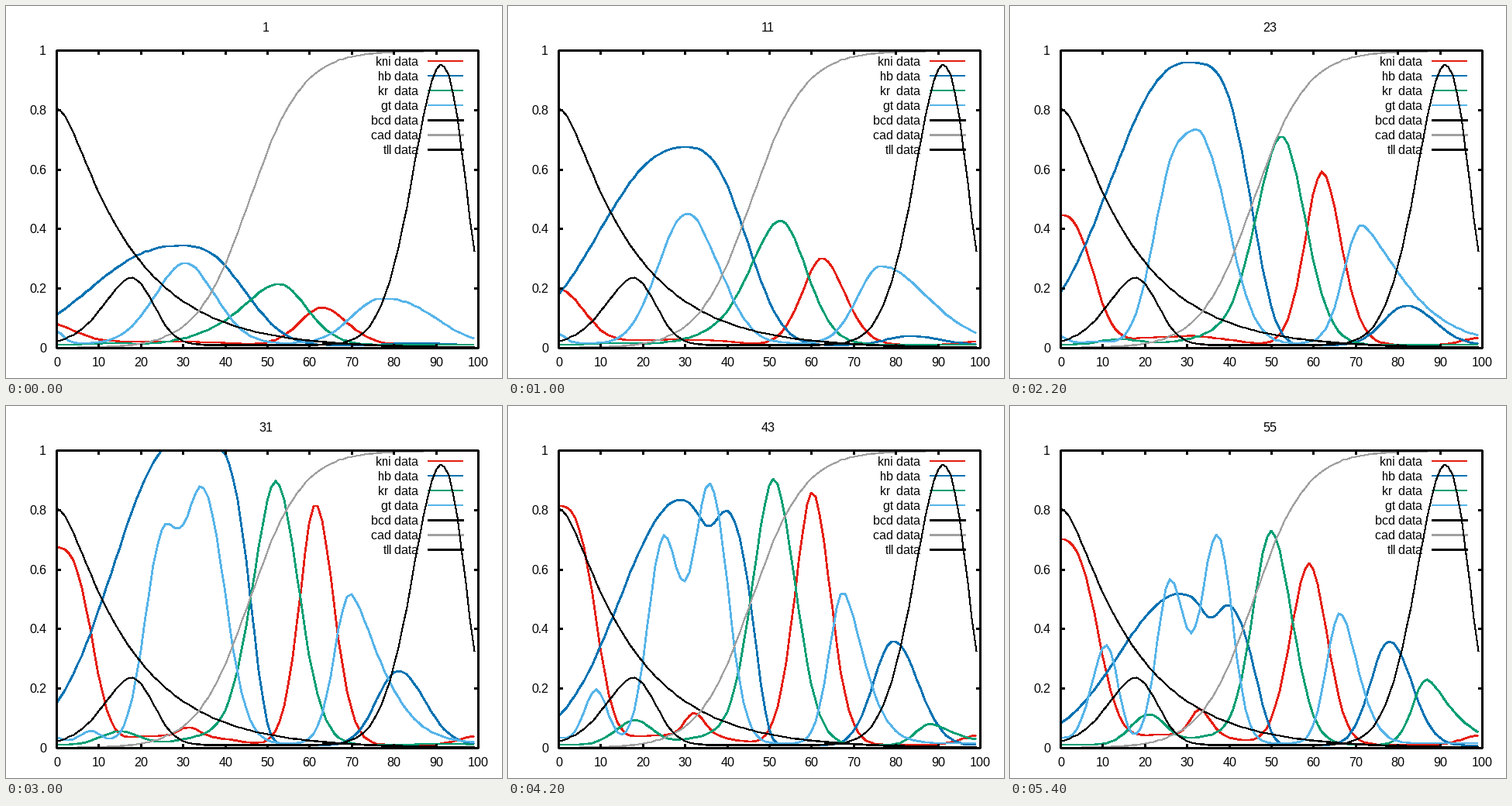
Animation, 640 px wide and 480 px high, one loop 5.5 s. Source, as a matplotlib script:

```python
import numpy as np
import matplotlib.pyplot as plt
from matplotlib.animation import FuncAnimation
from matplotlib.patches import Rectangle

W, H, DPI = 640, 480, 80
FRAMES, INTERVAL = 55, 100
LEFT, RIGHT, TOP, BOTTOM = 65, 609, 57, 441
PT = 72 / DPI  # points per pixel

plt.rcParams["font.family"] = "Liberation Sans"
plt.rcParams["text.hinting"] = "native"
plt.rcParams["text.hinting_factor"] = 1
plt.rcParams["toolbar"] = "None"

X = np.arange(100.0)


def at(value, frame):
    """A constant, or a tuple of keys spread evenly over the loop."""
    if isinstance(value, tuple):
        return np.interp(frame, np.linspace(0, FRAMES - 1, len(value)), value)
    return value


def bump(center, height, left, right, p_left=2, p_right=2):
    """Skewed bell with its own half-width and steepness on each side."""
    def shape(frame):
        c, h, wl, wr, pl, pr = (at(v, frame) for v in (center, height, left, right, p_left, p_right))
        u = np.where(X < c, (c - X) / wl, (X - c) / wr)
        return h * 0.5 ** u ** np.where(X < c, pl, pr)
    return shape


def total(base, *bumps):
    return lambda frame: base + sum(b(frame) for b in bumps)


kni = total(
    0.01,
    bump(0, (.07, .17, .32, .58, .83, .79, .69), 9, (6, 8, 9, 9.3), p_right=(1.4, 2.5, 3.2, 2.8)),
    bump((63, 61.8, 59), (.125, .27, .46, .73, .97, .79, .61), (6.3, 4.4, 5.2), (7, 5, 5), 1.9, 1.9),
    bump((31, 31, 33), (0, 0, 0, .01, .065, .08, .085), 2.5, 3),
    bump(28, (.01, .03, .035), 14, 14, 3, 3),
    bump(100, (0, .03, .033), 5, 5),
)
hb = total(
    0.008,
    bump((30, 30, 30, 28.5), (.335, .64, .87, 1.05, 1.0, .74, .51),
         (24, 21, 17.2, 17), (15.5, 15, 16.3, 17.5), (2.4, 2), (2.6, 3, 7, 6)),
    bump(35.7, (0, 0, 0, 0, -.09, -.09, -.08), 2.8, 2.6),
    bump((84.5, 81.5, 78), (.008, .025, .08, .2, .35, .35, .35), (7, 6.2, 5.2), (9.5, 7.5, 6.2)),
)
kr = total(
    0.01,
    bump((53, 52.4, 50), (.2, .39, .59, .83, .98, .84, .71), (9.2, 6.6, 5.1), (7.7, 6.3, 5.8), 1.9, 1.9),
    bump(38, .03, 9, 9),
    bump((13, 14.5, 21), (.005, .005, .01, .03, .075, .085, .1), (6, 5), (6, 4.5)),
    bump((91, 90, 87), (0, 0, 0, 0, .012, .1, .22), 4, 6.5, 2, 1.4),
)
gt = total(
    0.015,
    bump(0, (.04, .02, .015), 2, 2),
    bump((8, 8, 8, 11), (0, 0, 0, .012, .1, .22, .33), (3, 3, 3, 4.2), 3.1),
    bump((27, 26.5, 24.3, 26), (.15, .24, .41, .61, .75, .64, .54), (7.5, 5.5, 4.5, 3.7), (6.5, 5, 4.4, 4)),
    bump((33.5, 34, 35.3, 37.2), (.17, .28, .5, .77, .96, .82, .7), (6.5, 5.4, 4.9, 4.5), (7.5, 7.5, 5.3, 4.2)),
    bump((77, 77, 72.5, 70.2, 68.8, 67, 66.4), (.15, .25, .34, .47, .57, .48, .44),
         (8, 5.2, 4, 3.8), (14, 12, 5.8, 4.8), 2, (2.5, 1.4, 1.5, 1.7)),
)
tll = total(
    0.011,
    bump(17.5, .226, 7.5, 6.3, 1.7, 2.1),
    bump(91, .942, 7.9, 6.6, 1.8, 2.4),
)


def bcd(frame):
    return np.exp(-0.0612 * np.hypot(X, 3.55))


def cad(frame):
    return 1 / (1 + np.exp(-0.16 * (X - 45.8)))


def px(x):
    return np.round(LEFT + (RIGHT - LEFT) * x / 100)


def py(y):
    return np.round(BOTTOM - (BOTTOM - TOP) * y)


def offset(width):
    """Odd widths sit on pixel centres, even ones on pixel edges."""
    return 0.5 if width == 1 else 0


fig = plt.figure(figsize=(W / DPI, H / DPI), dpi=DPI, facecolor="white")
ax = fig.add_axes([0, 0, 1, 1])
ax.set_xlim(0, W)
ax.set_ylim(H, 0)
ax.axis("off")
window = Rectangle((LEFT - 5, TOP), RIGHT - LEFT + 10, BOTTOM - TOP + 5, transform=ax.transData)


def line(xs, ys, color="black", width=1, z=1):
    lw = 1.02 if width == 1 else 1.7
    return ax.plot(np.asarray(xs) + offset(width), np.asarray(ys) + offset(width),
                   color=color, lw=lw * PT, antialiased=False, snap=False, zorder=z,
                   solid_capstyle="butt", solid_joinstyle="miter")[0]


def label(x, y, s, ha="center", z=1):
    return ax.text(x, y, s, size=16 * PT, ha=ha, va="baseline", zorder=z)


CURVES = [
    (kni, "kni data", "#e51e10", 2),
    (hb, "hb data", "#0072b2", 2),
    (kr, "kr  data", "#009e73", 2),
    (gt, "gt data", "#56b4e9", 2),
    (bcd, "bcd data", "black", 1),
    (cad, "cad data", "#a0a0a0", 1),
    (tll, "tll data", "black", 1),
]

lines = []
for i, (curve, name, color, width) in enumerate(CURVES):
    y = 71 + 19 * i
    label(532, y + 6, name, "right", z=2 + i)
    line([544, 590], [y, y], color, width, z=2.3 + i)
    plot = line(px(X), py(curve(0)), color, width, z=2.6 + i)
    plot.set_clip_path(window)
    lines.append(plot)

# frame, ticks and tick labels
line([LEFT, RIGHT, RIGHT, LEFT, LEFT], [BOTTOM, BOTTOM, TOP, TOP, BOTTOM], z=20)
for v in range(0, 101, 10):
    x = px(v)
    line([x, x], [BOTTOM, BOTTOM - 5], z=20)
    line([x, x], [TOP, TOP + 5], z=20)
    label(x + 0.5, 465, str(v))
for k in range(6):
    y = py(k / 5)
    line([LEFT, LEFT + 5], [y, y], z=20)
    line([RIGHT, RIGHT - 5], [y, y], z=20)
    label(52, y + 6, f"{k / 5:g}", "right")

title = label(335.5, 33, "1")


def update(frame):
    title.set_text(str(frame + 1))
    for plot, (curve, _, _, width) in zip(lines, CURVES):
        plot.set_ydata(py(curve(frame)) + offset(width))
    return [title, *lines]


anim = FuncAnimation(fig, update, frames=FRAMES, interval=INTERVAL,
                     init_func=lambda: update(0), repeat=True, repeat_delay=0, blit=False)
plt.show()
```
